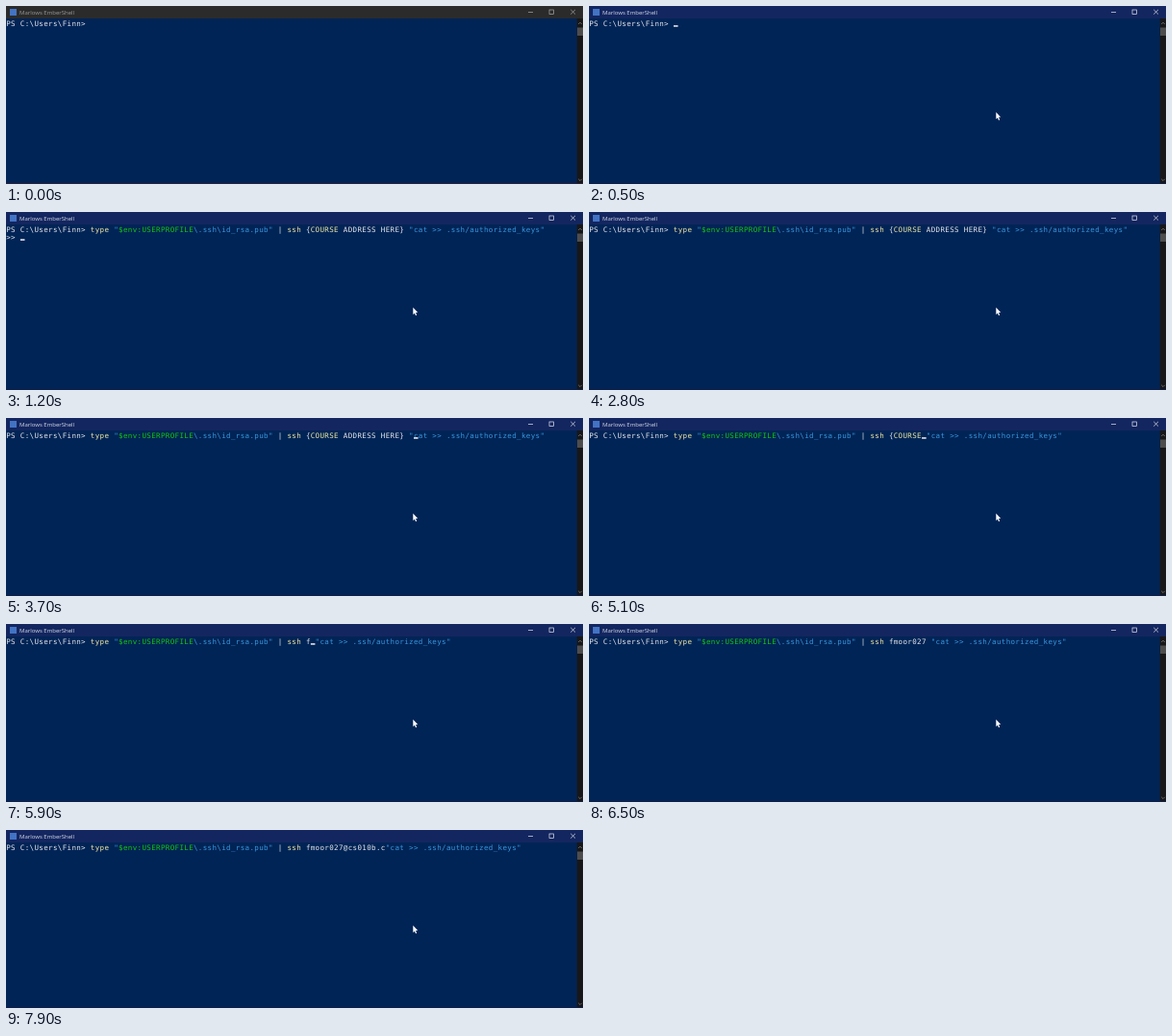
These frames come from a looping animation (600 px wide and 186 px high, 8000 ms). An HTML page with a canvas:

```html
<!DOCTYPE html>
<html lang="en">
<head>
<meta charset="utf-8">
<title>Terminal</title>
<style>
html, body { margin: 0; width: 600px; height: 186px; overflow: hidden; background: #012456; }
canvas { display: block; width: 600px; height: 186px; }
</style>
</head>
<body>
<canvas id="stage"></canvas>
<script>
const W = 600, H = 186, LOOP = 8000;
const CELL = 4.87, LINE = 8.1, BASE = 20.9;
const WHITE = '#e6e7ec', YELLOW = '#f1eaa4', GREEN = '#16c60c', CYAN = '#3a96dd';
const PROMPT = 'PS C:\\Users\\Finn> ';
const PLACEHOLDER = '{COURSE ADDRESS HERE}';
const HOST = 'fmoor027@cs010b.c';
const ARG = 64;                       // column where the ssh argument starts
const ARG_END = ARG + PLACEHOLDER.length;

const canvas = document.getElementById('stage');
const ctx = canvas.getContext('2d');
const dpr = window.devicePixelRatio || 1;
canvas.width = W * dpr;
canvas.height = H * dpr;

const clamp = (v, a, b) => Math.min(b, Math.max(a, v));

function rect(x, y, w, h, color) {
  ctx.fillStyle = color;
  ctx.fillRect(x, y, w, h);
}

function path(points, color, close) {
  ctx.beginPath();
  points.forEach(([x, y]) => ctx.lineTo(x, y));
  if (close) {
    ctx.fillStyle = color;
    ctx.fill();
  } else {
    ctx.strokeStyle = color;
    ctx.stroke();
  }
}

// Draws coloured runs on the character grid.
function write(runs, row = 0) {
  ctx.font = '7.5px "DejaVu Sans Mono", monospace';
  let col = 0;
  for (const [text, color] of runs) {
    ctx.fillStyle = color;
    for (const ch of text) ctx.fillText(ch, col++ * CELL + 0.2, BASE + row * LINE);
  }
}

function caret(col, row = 0) {
  rect(col * CELL + 0.3, 20.2 + row * LINE, CELL - 0.3, 1.5, '#f4f4f4');
}

function erased(t) {
  if (t < 4600) return 0;
  const n = t < 5100 ? Math.floor((t - 4600) / 36) + 1 : 14 + Math.floor((t - 5100) / 60);
  const slow = t < 5400 ? n : 19 + Math.floor((t - 5400) / 100);
  return Math.min(slow, PLACEHOLDER.length);
}

function typed(t) {
  if (t < 5900) return 0;
  if (t < 6700) return Math.min(8, 1 + Math.floor((t - 5900) / 85.7));
  if (t < 7200) return Math.min(11, 9 + Math.floor((t - 6700) / 100));
  return Math.min(17, 12 + Math.floor((t - 7200) / 140));
}

function argument(t) {
  if (t < 5700) {
    const text = PLACEHOLDER.slice(0, PLACEHOLDER.length - erased(t));
    return [[text.slice(0, 1), WHITE], [text.slice(1, 7), YELLOW], [text.slice(7), WHITE]];
  }
  return [[HOST.slice(0, typed(t)), WHITE]];
}

function command(t) {
  const gap = typed(t) < HOST.length ? ' ' : '';
  return [
    [PROMPT, WHITE], ['type ', YELLOW],
    ['"', CYAN], ['$env:USERPROFILE', GREEN], ['\\.ssh\\id_rsa.pub"', CYAN],
    [' | ', WHITE], ['ssh ', YELLOW],
    ...argument(t),
    [gap + '"cat >> .ssh/authorized_keys"', CYAN]
  ];
}

function drawCaret(t) {
  const on = (a, b) => t >= a && t < b;
  if (on(370, 900)) caret(PROMPT.length);
  else if (on(1200, 1700)) caret(3, 1);
  else if (on(2000, 2500)) caret(115);
  else if (on(2830, 4300)) caret(clamp(114 - Math.floor((t - 2830) / 31.5), ARG_END, 115));
  else if (on(4600, 5700)) caret(ARG_END - erased(t));
  else if (on(5900, 6490) || on(6700, 7840)) caret(ARG + typed(t));
}

function drawFrame(active) {
  rect(0, 0, W, H, '#012456');
  rect(0, 0, W, 13, active ? '#13265f' : '#2b2b2b');
  rect(4, 3, 7, 7, '#4373c4');
  ctx.font = '6px "Open Sans", sans-serif';
  ctx.fillStyle = active ? '#d6dbea' : '#9a9a9a';
  ctx.fillText('Marlows EmberShell', 14, 8.7);

  const ink = active ? '#e4e6f0' : '#a8a8a8';
  ctx.lineWidth = 0.7;
  path([[543, 6.5], [548, 6.5]], ink);
  ctx.strokeStyle = ink;
  ctx.strokeRect(565, 4, 4.6, 4.6);
  path([[587.2, 3.8], [592, 8.6]], ink);
  path([[592, 3.8], [587.2, 8.6]], ink);

  rect(593.7, 13, 6.3, 172, '#171719');
  rect(594, 22.5, 6, 8.5, '#4d4d4d');
  path([[595.2, 19], [597, 17.2], [598.8, 19]], '#8c8c8c');
  path([[595.2, 180.8], [597, 182.6], [598.8, 180.8]], '#8c8c8c');
  rect(0, 185, W, 1, active ? '#101d45' : '#2b2036');
}

function drawPointer(t) {
  const k = clamp((t - 100) / 800, 0, 1);
  const y = 99.8 + 90 * Math.pow(1 - k, 3);
  const shape = [[0, 0], [0, 8.2], [1.9, 6.5], [3.2, 9.4], [4.5, 8.8], [3.2, 6], [5.7, 5.8]]
    .map(([a, b]) => [423.3 + a * 0.85, y + b * 0.9]);
  path(shape, '#ffffff', true);
}

function draw(t) {
  ctx.setTransform(dpr, 0, 0, dpr, 0, 0);
  const active = t >= 100;
  drawFrame(active);
  if (t < 1200) write([[PROMPT, WHITE]]);
  else write(command(t));
  if (t >= 1200 && t < 1900) write([['>> ', WHITE]], 1);
  drawCaret(t);
  if (active) drawPointer(t);
}

const start = performance.now();
function tick(now) {
  draw(Math.max(0, now - start) % LOOP);
  requestAnimationFrame(tick);
}
draw(0);
requestAnimationFrame(tick);
</script>
</body>
</html>
```
